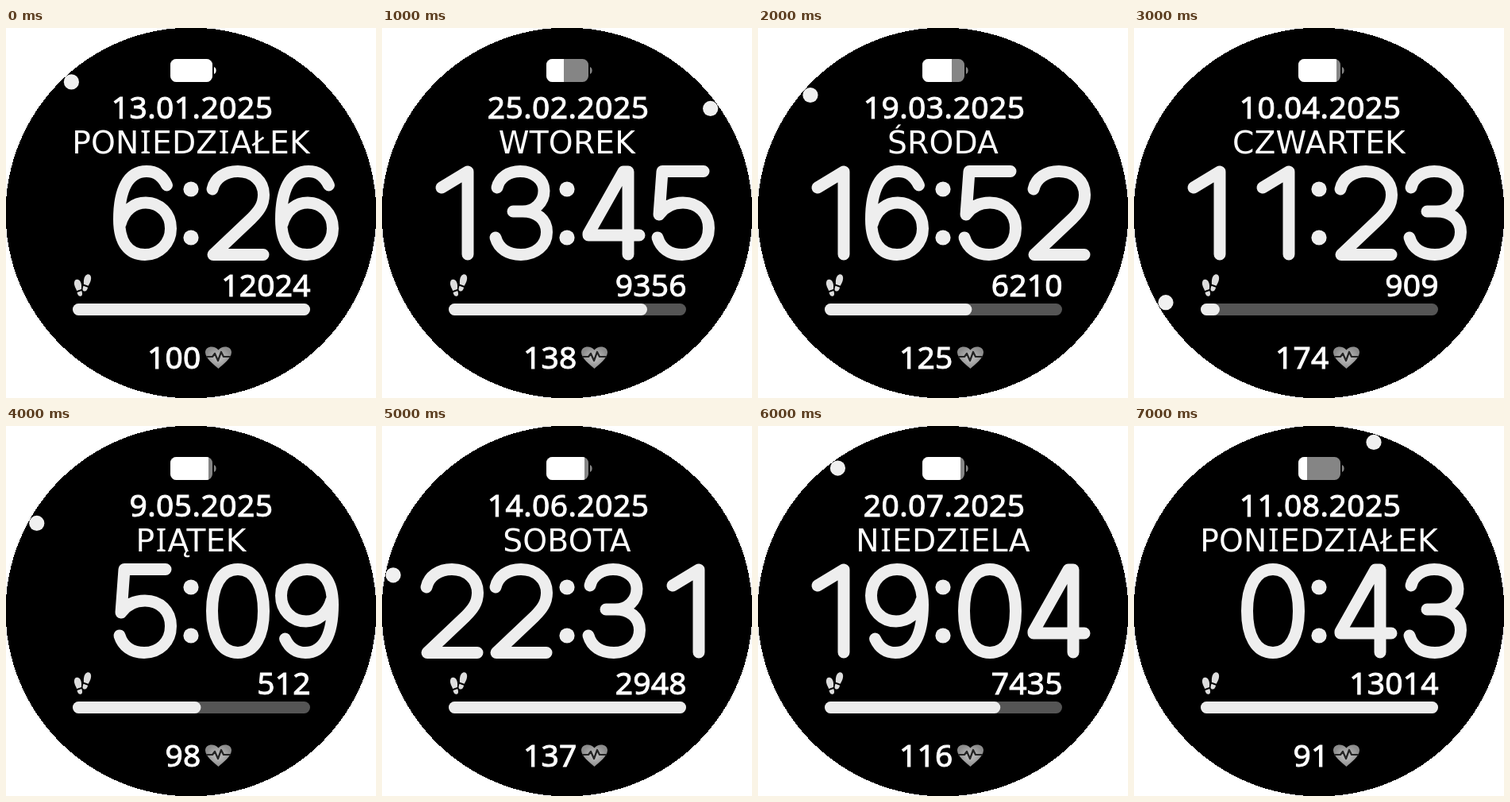
Animation of 466x466 px, one loop 8000 ms. Source, as an HTML page:

```html
<!DOCTYPE html>
<html lang="pl">
<head>
<meta charset="utf-8">
<title>Watch face</title>
<style>
html, body { margin: 0; width: 100%; height: 100%; overflow: hidden; background: #fff; }
svg { display: block; width: 466px; height: 466px; }
text { fill: #fff; font-kerning: none; }
.num { font: 39px "Noto Sans", sans-serif; letter-spacing: .2px; text-anchor: end; stroke: #fff; stroke-width: 1; }
#date { letter-spacing: .45px; }
#day { font: 39.2px "DejaVu Sans", sans-serif; letter-spacing: .2px; text-anchor: middle; }
#day .serif { font: 40px "Noto Sans", sans-serif; letter-spacing: 1.4px; }
#time { fill: none; stroke: #eee; stroke-width: 15; stroke-linecap: round; stroke-linejoin: round; }
</style>
</head>
<body>
<svg viewBox="0 0 466 466">
  <defs>
    <clipPath id="body"><rect x="207" y="39" width="53" height="29" rx="7.5"/></clipPath>
    <filter id="soft"><feGaussianBlur stdDeviation=".6"/></filter>
    <radialGradient id="grey"><stop offset=".3" stop-color="#b4b4b4"/><stop offset="1" stop-color="#8c8c8c"/></radialGradient>
    <g id="foot">
      <path d="M-4.6-4C-4.8-8-3-11-.3-11C3-11 5-8 4.8-4C4.7-1 3.8 1 3.4 2.5L-3.2 3.2C-3.4 1-4.5-1-4.6-4Z"/>
      <path d="M-3.1 5.2L3.3 4.5C4 8 3.2 11 .7 11C-2 11-3.2 8.5-3.1 5.2Z"/>
    </g>
  </defs>
  <circle cx="233" cy="233" r="233.5" shape-rendering="crispEdges"/>
  <circle id="dot" r="9.6" fill="#f0f0f0"/>

  <g clip-path="url(#body)">
    <rect x="207" y="39" width="53" height="29" fill="#858585"/>
    <rect id="charge" x="207" y="39" height="29" fill="#fff"/>
  </g>
  <path id="tip" d="M262 49C265.500 50 265.500 57 262 58Z"/>

  <text id="date" class="num" x="336.500" y="114"/>
  <text id="day" x="233" y="158"/>
  <g id="time"></g>
  <g fill="#eee"><circle cx="233" cy="203" r="9.6"/><circle cx="233" cy="264" r="9.6"/></g>

  <g fill="#ddd">
    <use href="#foot" transform="translate(91.3 327.3) rotate(-12) scale(.92 .98)"/>
    <use href="#foot" transform="translate(101.6 321) rotate(14) scale(-.92 1)"/>
  </g>
  <text id="steps" class="num" x="383.700" y="338"/>
  <rect x="84" y="347" width="299" height="15" rx="7.5" fill="#555"/>
  <rect id="bar" x="84" y="347" height="15" rx="7.5" fill="#ececec"/>

  <text id="pulse" class="num" x="245.500" y="429"/>
  <g filter="url(#soft)">
    <path d="M267.500 429C262 424 251 416 251 408.500C251 400.500 262.500 399 267.500 405.500C272.500 399 284 400.500 284 408.500C284 416 273 424 267.500 429Z" fill="url(#grey)"/>
    <path d="M252 414H260L263 410L267 419L271 408L274 414H283" fill="none" stroke="#222" stroke-width="2.2" stroke-linejoin="round"/>
  </g>
</svg>
<script>
const $ = id => document.getElementById(id);

// Stroke paths in an 80 x 120 cell
const six = 'M67.500 25C62 13 53 7.500 42 7.500C18 7.500 7.500 32 7.500 68C7.500 98 20 112.500 40 112.500' +
  'C58 112.500 72.500 98 72.500 79.500S59 47 41 47C27 47 14 56 9 74';
const glyphs = {
  0: 'M40 7.500C62 7.500 72.500 30 72.500 60S62 112.500 40 112.500S7.500 90 7.500 60S18 7.500 40 7.500Z',
  1: 'M27 28L60 8V112',
  2: 'M8 30C11 16 24 7.500 40 7.500C59 7.500 72.500 20 72.500 37C72.500 50 66 58 57 67L9 112.500H72',
  3: 'M10 28C13 15 25 7.500 39 7.500C56 7.500 69 18 69 32C69 47 57 58 42 58H30M42 58C60 58 72.500 68 72.500 84C72.500 101 58 112.500 40 112.500C24 112.500 12 105 8 91',
  4: 'M58 112V8H52L8 86V88H72',
  5: 'M66 7.500H14L10 62C17 52 28 47 40 47C59 47 72.500 60 72.500 79C72.500 99 58 112.500 39 112.500C23 112.500 12 104 8 91',
  6: six,
  9: six
};
const cells = [48, 135, 252, 339];

// date, day, time, second, battery %, steps, goal %, pulse
const states = [
  ['13.01.2025', 'PONIEDZIAŁEK', '6:26', 53, 100, 12024, 100, 100],
  ['25.02.2025', 'WTOREK', '13:45', 9, 41, 9356, 83.6, 138],
  ['19.03.2025', 'ŚRODA', '16:52', 52, 70, 6210, 62, 125],
  ['10.04.2025', 'CZWARTEK', '11:23', 40, 91, 909, 8, 174],
  ['9.05.2025', 'PIĄTEK', '5:09', 50, 91, 512, 54, 98],
  ['14.06.2025', 'SOBOTA', '22:31', 47, 91, 2948, 100, 137],
  ['20.07.2025', 'NIEDZIELA', '19:04', 54, 91, 7435, 74, 116],
  ['11.08.2025', 'PONIEDZIAŁEK', '0:43', 3, 20, 13014, 100, 91]
];

function digit(d, x) {
  const turn = d === '9' ? ' rotate(180 40 60)' : '';
  return `<path d="${glyphs[d]}" transform="translate(${x} 173)${turn}"/>`;
}

function show([date, day, time, second, battery, steps, goal, pulse]) {
  Object.entries({ date, steps, pulse }).forEach(([id, v]) => $(id).textContent = v);
  $('day').innerHTML = day.replace(/I/g, '<tspan class="serif" dx="1.4">I</tspan>');
  $('time').innerHTML = [...time.replace(':', '').padStart(4)]
    .map((d, i) => d === ' ' ? '' : digit(d, cells[i])).join('');
  const a = second * 5.993 * Math.PI / 180;
  $('dot').setAttribute('cx', 233 + 223.5 * Math.sin(a));
  $('dot').setAttribute('cy', 233 - 223.5 * Math.cos(a));
  $('charge').setAttribute('width', Math.round(53 * battery / 100));
  $('tip').setAttribute('fill', battery === 100 ? '#fff' : '#858585');
  $('bar').setAttribute('width', 299 * goal / 100);
}

let current = -1;
function tick() {
  const i = Math.floor(performance.now() / 1000) % states.length;
  if (i !== current) show(states[current = i]);
  requestAnimationFrame(tick);
}
tick();
</script>
</body>
</html>
```
